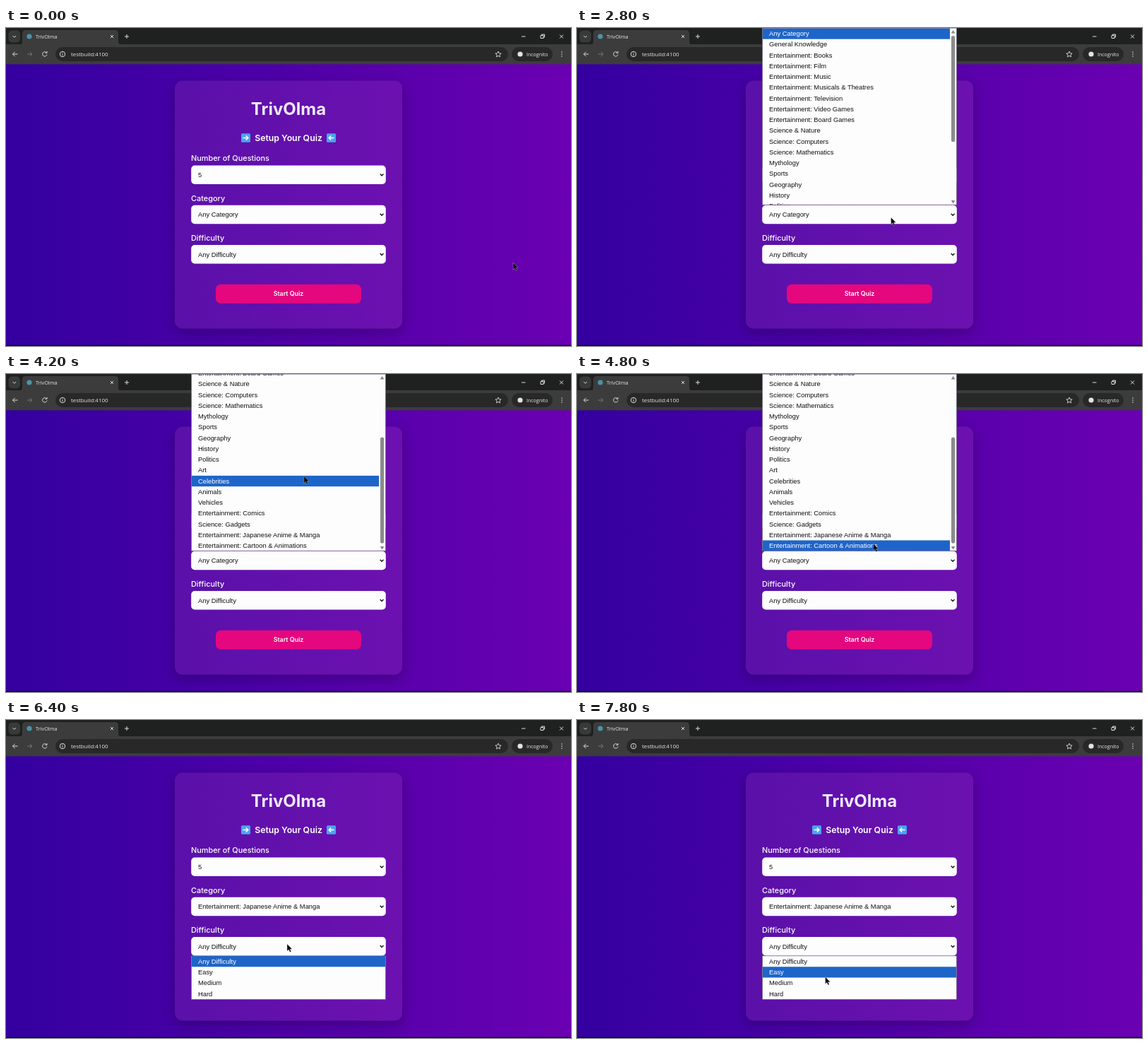
Animation of 800x450 px, one loop 8000 ms. Source, as an HTML page:

```html
<!DOCTYPE html>
<html lang="en">
<head>
<meta charset="utf-8">
<title>TrivOlma</title>
<style>
  html, body { margin: 0; height: 100%; overflow: hidden; background: #1f2020; }
  svg { display: block; }
  .ui { font: 7.3px "Open Sans", sans-serif; fill: #e8e8e8; }
  .page { font: 500 10.9px Inter, sans-serif; fill: #fff; }
  .bold { font-weight: 600; text-anchor: middle; }
  .title { font-size: 24px; font-weight: 700; fill: #f1eaff; }
  .field { font: 9.36px "Liberation Sans", Arial, sans-serif; fill: #111; }
  .line { fill: none; stroke: #dcdcdc; }
</style>
</head>
<body>
<svg id="stage" width="800" height="450" viewBox="0 0 800 450">
  <defs>
    <linearGradient id="bg"><stop stop-color="#3400a0"/><stop offset="1" stop-color="#6a00b1"/></linearGradient>
    <linearGradient id="card"><stop stop-color="#5a10a9"/><stop offset="1" stop-color="#6c11b0"/></linearGradient>
    <filter id="blur" x="-20%" y="-20%" width="140%" height="140%"><feGaussianBlur stdDeviation="9"/></filter>
  </defs>

  <!-- page -->
  <rect y="51" width="800" height="399" fill="url(#bg)"/>
  <rect y="448.7" width="800" height="1.3" fill="#0c0418"/>
  <rect x="239" y="80" width="322" height="351" rx="11" opacity=".25" filter="url(#blur)"/>
  <rect x="239" y="74.5" width="322" height="351" rx="11" fill="url(#card)"/>
  <g class="page">
    <text class="bold title" x="400" y="123">TrivOlma</text>
    <text class="bold" x="400" y="160" style="font-size:12.3px">Setup Your Quiz</text>
    <text x="262" y="188">Number of Questions</text>
    <text x="262" y="244.5">Category</text>
    <text x="262" y="300.5">Difficulty</text>
    <rect x="297" y="362.7" width="206" height="27" rx="7" fill="#e5077e"/>
    <text class="bold" x="400" y="379.2" style="font-size:8.9px">Start Quiz</text>
  </g>
  <g id="badge">
    <rect x="333" y="149.3" width="13" height="12.5" rx="1.5" fill="#4aa5ee"/>
    <path d="M335.5 155.5h7M339.8 152.5l3 3-3 3" fill="none" stroke="#fff" stroke-width="1.6"/>
  </g>
  <use href="#badge" transform="matrix(-1 0 0 1 800 0)"/>
  <g id="fields" class="field"></g>

  <!-- browser frame -->
  <rect width="800" height="24" fill="#1f2020"/>
  <rect y="23" width="800" height="28.3" fill="#3c3c3c"/>
  <path d="M18 24q5 0 5-5V8q0-5 5-5h126q5 0 5 5v11q0 5 5 5z" fill="#3c3c3c"/>
  <rect x="3.5" y="3.5" width="16.5" height="17" rx="5" fill="#383939"/>
  <rect x="70" y="27" width="641" height="20" rx="10" fill="#282828"/>
  <rect x="716" y="27" width="58" height="20" rx="10" fill="#282828"/>
  <circle cx="33" cy="12" r="3.6" fill="#4b93a8"/>
  <circle cx="728" cy="37" r="3.6" fill="#e3e3e3"/>
  <g class="line">
    <path d="M9.5 11l2.3 2.3 2.3-2.3M148 10l4 4m0-4l-4 4M168 12h6m-3-3v6"/>
    <path d="M730 12h5.5M784 9.5l5 5m0-5l-5 5M757 10.5h4v4h-4zM758.5 10.5V9h4v4H761"/>
    <path d="M16.5 37h-7m3.2-3.2L9.5 37l3.2 3.2"/>
    <path d="M30 37h7m-3.2-3.2L37 37l-3.2 3.2" stroke="#777"/>
    <path d="M57.3 34.8a3.2 3.2 0 1 0 .7 2.7M58 33v2.3h-2.3"/>
    <circle cx="80" cy="37" r="3.7"/><path d="M80 36.4V39m0-4.3v.9"/>
    <path d="M697 33l1.2 2.7 2.9.3-2.2 2 .6 2.9-2.5-1.5-2.5 1.5.6-2.9-2.2-2 2.9-.3z" stroke-width=".9"/>
    <path d="M787 34h0m0 3h0m0 3h0" stroke-width="1.6" stroke-linecap="round"/>
  </g>
  <g class="ui">
    <text x="42" y="14.7">TrivOlma</text>
    <text x="92" y="39.8" style="font-size:7.9px">testbuild:4100</text>
    <text x="737" y="39.5" style="font-size:7px">Incognito</text>
  </g>

  <g id="menu" class="field"></g>
  <path id="cursor" d="M0 0V10L2.3 7.9 4 11.5 5.7 10.7 4.1 7.3H7.2Z" fill="#0b0b0b" stroke="#fff" stroke-opacity=".55" stroke-width=".5"/>
</svg>

<script>
const LOOP = 8000, STEP = 200, ROW = 15.25, SCROLL_START = 3400, SCROLL_END = 3800;
const $ = id => document.getElementById(id);
const safe = s => s.replace(/&/g, '&amp;');
const clamp = p => Math.min(1, Math.max(0, p));
const fun = s => 'Entertainment: ' + s, sci = s => 'Science: ' + s;

const categories = [
  'Any Category', 'General Knowledge', ...['Books', 'Film', 'Music', 'Musicals & Theatres',
  'Television', 'Video Games', 'Board Games'].map(fun), 'Science & Nature', sci('Computers'),
  sci('Mathematics'), 'Mythology', 'Sports', 'Geography', 'History', 'Politics', 'Art',
  'Celebrities', 'Animals', 'Vehicles', fun('Comics'), sci('Gadgets'),
  fun('Japanese Anime & Manga'), fun('Cartoon & Animations')];

const menus = [
  { from: 1200, to: 2000, top: 221, height: 62, items: ['5', '10', '15', '20'] },
  { from: 2600, to: 5600, top: 0, height: 250.5, items: categories, scrolls: true },
  { from: 6400, to: LOOP, top: 333.6, height: 62, items: ['Any Difficulty', 'Easy', 'Medium', 'Hard'] }
];

// Pointer moves: start, end, and where the tip comes to rest
const moves = [
  [0, 1200, 471, 205], [1800, 2600, 444.5, 268], [2800, 3200, 424, 126],
  [3400, 3600, 423.5, 118], [3600, 4600, 421, 159], [4600, 4800, 419.5, 240],
  [4800, 5200, 420, 229], [5400, 6000, 398, 317], [6400, 7600, 351.5, 363.5]];

const pointerAt = t => moves.reduce(([x, y], [start, end, toX, toY]) => {
  const p = clamp((t - start) / (end - start)), ease = p * p * (3 - 2 * p);
  return [x + (toX - x) * ease, y + (toY - y) * ease];
}, [718, 332]);

const scrollAt = t => 131 * (1 - (1 - clamp((t - SCROLL_START) / (SCROLL_END - SCROLL_START))) ** 3.64);

// Row under the pointer; it stays fixed while the list is scrolling
function hoverAt(menu, t) {
  if (t > SCROLL_START && t < SCROLL_END) t = SCROLL_START;
  const y = pointerAt(t)[1] - menu.top;
  return y < 0 || y > menu.height ? 0 : Math.floor((y + (menu.scrolls ? scrollAt(t) : 0)) / ROW);
}

const field = (value, i) => {
  const y = 194.6 + 56.25 * i;
  return `<rect x="262.2" y="${y}" width="275.6" height="26.4" rx="5" fill="#fdfdfd"/>
    <text x="272" y="${y + 16.5}">${safe(value)}</text>
    <path d="M529.7 ${y + 12}l2.4 2.4 2.4-2.4" fill="none" stroke="#111" stroke-width="1.4"/>`;
};

function menuMarkup(menu, t) {
  const { top, height, items, scrolls } = menu;
  const scroll = scrolls ? scrollAt(t) : 0, hover = hoverAt(menu, t);
  const rows = items.map((text, i) => {
    const y = i * ROW - scroll + .4, on = i === hover;
    return (on ? `<rect x="1" y="${y}" width="${scrolls ? 265 : 274}" height="${ROW}" fill="#1e65c9"/>` : '') +
      `<text x="10" y="${y + 10.8}" fill="${on ? '#fff' : '#111'}">${safe(text)}</text>`;
  }).join('');
  const bar = scrolls ? `
    <rect x="266" width="9" height="250" fill="#fbfbfb"/>
    <rect x="268" y="${11 + scroll * .6}" width="5.2" height="150" rx="2.6" fill="#8b8b8b"/>
    <path d="M267.8 7.5h5.6l-2.8-4.5zM267.8 244h5.6l-2.8 4.5z" fill="#858585"/>` : '';
  return `<svg x="262" y="${top}" width="276" height="${height}">
    <rect x=".5" width="275" height="${height}" fill="#fdfdfd"/>${rows}${bar}
    <rect x=".5" y=".2" width="275" height="${height - .5}" fill="none" stroke="#6d6780" stroke-width=".7"/></svg>`;
}

let last = -1;
function draw(now) {
  const t = Math.floor(now % LOOP / STEP) * STEP;
  if (t !== last) {
    last = t;
    const menu = menus.find(m => t >= m.from && t < m.to);
    $('fields').innerHTML = ['5', categories[t < menus[1].to ? 0 : 23], 'Any Difficulty'].map(field).join('');
    $('menu').innerHTML = menu ? menuMarkup(menu, t) : '';
    $('cursor').setAttribute('transform', `translate(${pointerAt(t)})`);
  }
  requestAnimationFrame(draw);
}
requestAnimationFrame(draw);
</script>
</body>
</html>
```
